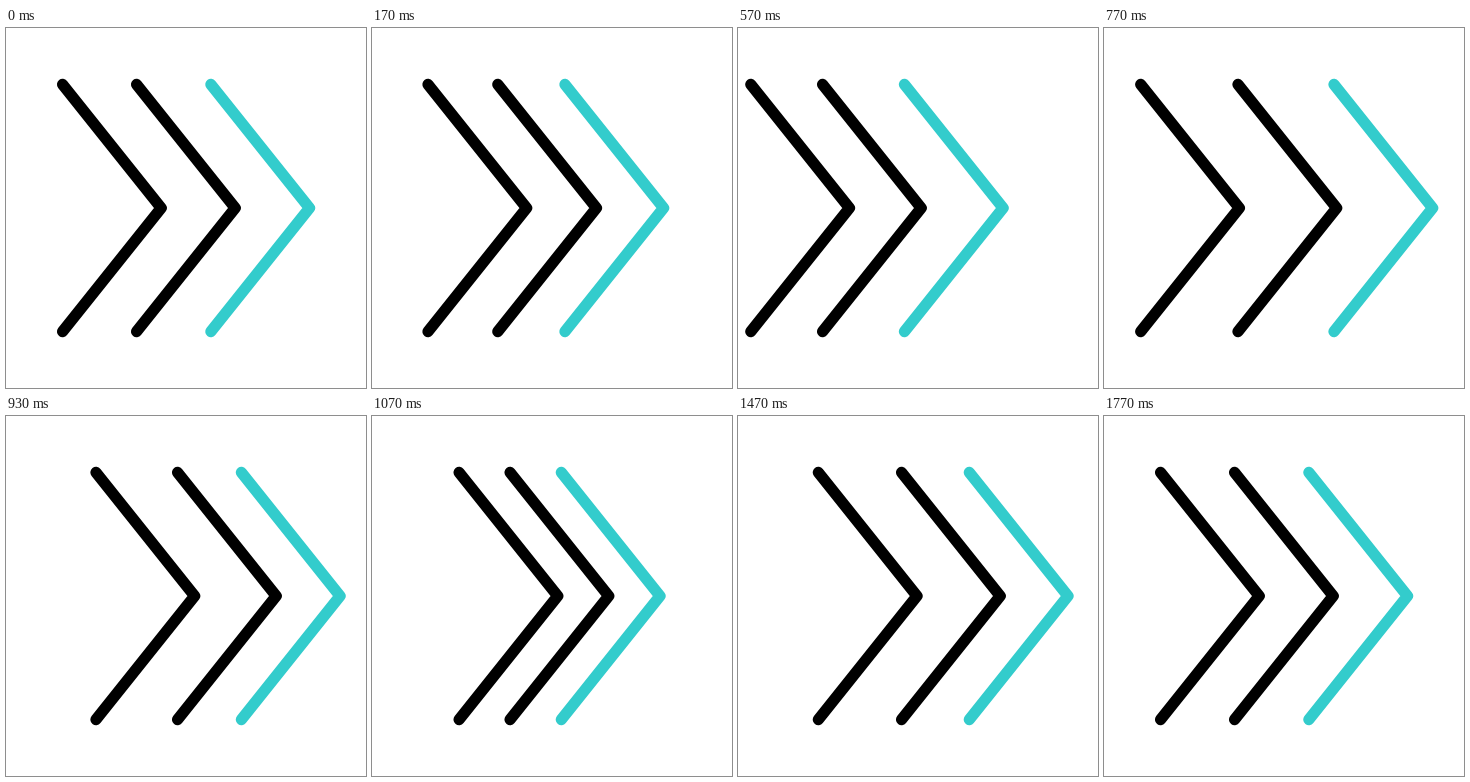
Recreate the animation shown at these times as an HTML page. Size 360x360 px, loop 2 s.

```html
<!DOCTYPE html>
<html>
<head>
<meta charset="utf-8">
<style>
  html, body { margin: 0; width: 100%; height: 100%; overflow: hidden; background: #fff; }
  svg { display: block; width: 100%; height: 100%; }
  path { fill: none; stroke: #000; stroke-width: 11.3; stroke-linecap: round; stroke-linejoin: round; }
  .lead { stroke: #33cccc; }
</style>
</head>
<body>
<svg viewBox="0 0 360 360">
  <path d="M56.6 56.4 155.2 180 56.6 303.6"/>
  <path d="M130.6 56.4 229.2 180 130.6 303.6"/>
  <path class="lead" d="M204.9 56.4 303.5 180 204.9 303.6"/>
</svg>
<script>
const LOOP = 2000, FPS = 30, LAG = 2;
// [frame, horizontal offset]
const KEYS = [[0, 0], [15, -46], [26, 41], [34, -26], [42, 33], [49, 0]];
const chevrons = document.querySelectorAll('path');

function offset(frame) {
  const next = KEYS.findIndex(key => key[0] > frame);
  if (frame <= 0 || next < 0) return 0;
  const [f0, x0] = KEYS[next - 1], [f1, x1] = KEYS[next];
  const p = (frame - f0) / (f1 - f0);
  return x0 + (x1 - x0) * p * p * (3 - 2 * p);
}

function draw(now) {
  // Steps at 30 fps, rounded to 10 ms
  const frame = Math.floor((now % LOOP + 5) * FPS / 1000);
  chevrons.forEach((chevron, i) =>
    chevron.setAttribute('transform', `translate(${offset(frame - LAG * (2 - i))} 0)`));
}

const start = performance.now();
function tick() {
  draw(performance.now() - start);
  requestAnimationFrame(tick);
}
tick();
</script>
</body>
</html>
```
